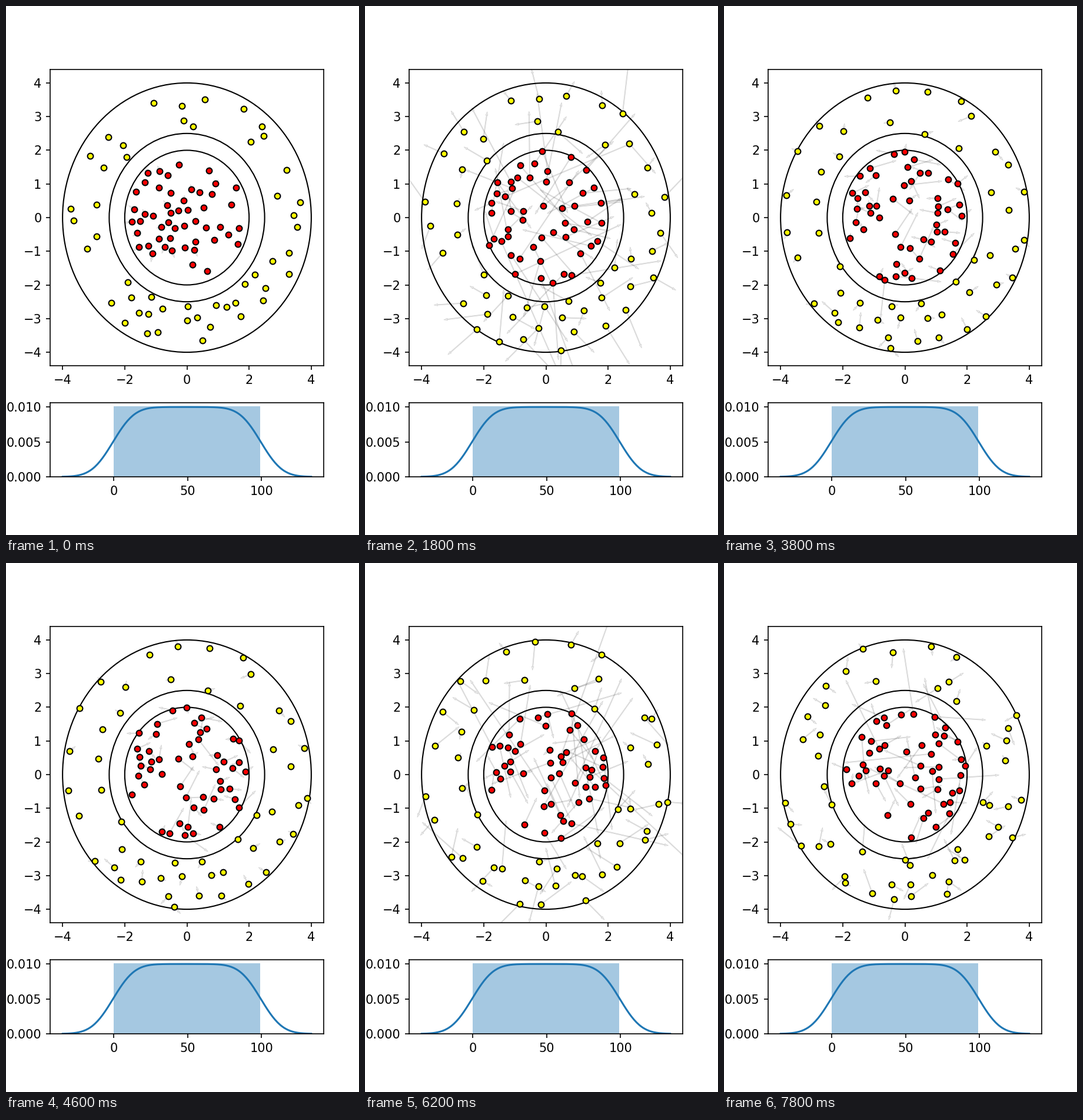
A matplotlib script for the animation above (8000 ms loop, 600 by 900 pixels).

```python
import numpy as np
import matplotlib.pyplot as plt
from matplotlib.animation import FuncAnimation

FRAMES, INTERVAL = 40, 200
SUBSTEPS = 12
COUNT = 50             # balls per chamber
CONTACT = 0.2          # centre distance at which two balls collide
REPULSION = 0.027      # strength of the push that starts the motion
ADVANCE = 0.0522       # share of a drift vector covered per frame at pace 1


def pace(frame):
    """Shared speed of all balls: two surges with a lull between."""
    return np.interp(frame, [0, 4, 9, 15, 23, 31, 35, 39],
                     [.26, 1.75, 4, 1.4, .9, 3.7, 3.5, 2.1])


def scatter(rng, inner, outer, power, gap):
    """Random points in a ring, none closer together than gap."""
    points = []
    while len(points) < COUNT:
        r = inner + (outer - inner) * rng.random() ** power
        angle = rng.uniform(0, 2 * np.pi)
        p = r * np.array([np.cos(angle), np.sin(angle)])
        if all(np.hypot(*(p - q)) > gap for q in points):
            points.append(p)
    return np.array(points)


def repel(pos):
    """Inverse-square push on each ball from all the others."""
    diff = pos[:, None] - pos[None]
    dist = np.linalg.norm(diff, axis=2)
    np.fill_diagonal(dist, np.inf)
    return REPULSION * (diff / dist[..., None] ** 3).sum(axis=1)


def bounce_walls(pos, vel, inner, outer):
    r = np.hypot(*pos.T)
    normal = pos / r[:, None]
    out = (vel * normal).sum(axis=1)
    hit = ((r > outer) & (out > 0)) | ((r < inner) & (out < 0))
    vel[hit] -= 2 * out[hit, None] * normal[hit]


def bounce_pairs(pos, vel):
    gap = np.linalg.norm(pos[:, None] - pos[None], axis=2)
    for i, j in np.argwhere(np.triu(gap < CONTACT, 1)):
        normal = (pos[i] - pos[j]) / gap[i, j]
        closing = (vel[i] - vel[j]) @ normal
        if closing < 0:
            vel[i] -= closing * normal
            vel[j] += closing * normal


def simulate(pos, inner, outer):
    """Positions and velocities for every frame of the loop."""
    vel = repel(pos)
    track = []
    for frame in range(FRAMES):
        track.append((pos.copy(), vel * pace(frame)))
        for sub in range(SUBSTEPS):
            t = frame + (sub + 0.5) / SUBSTEPS
            pos += vel * pace(t) * ADVANCE / SUBSTEPS
            bounce_walls(pos, vel, inner, outer)
            bounce_pairs(pos, vel)
    return track


def draw_density(ax):
    """One histogram bar over 0..99 and its kernel density curve."""
    data = np.arange(100)
    width = data.std(ddof=1) * len(data) ** -0.2
    x = np.linspace(-3 * width, 99 + 3 * width, 200)
    z = (x[:, None] - data) / width
    y = np.exp(-z ** 2 / 2).mean(axis=1) / (width * np.sqrt(2 * np.pi))
    ax.bar(0, 1 / 99, width=99, align="edge", color="C0", alpha=0.4)
    ax.plot(x, y, color="C0", lw=1.5)
    pad = 0.05 * (x[-1] - x[0])
    ax.set_xlim(x[0] - pad, x[-1] + pad)
    ax.set_ylim(0, 1.05 / 99)


fig = plt.figure(figsize=(4, 6), dpi=150, facecolor="white")
ax = fig.add_axes([0.125, 0.32, 0.775, 0.56])
ax.set_xlim(-4.4, 4.4)
ax.set_ylim(-4.4, 4.4)
for radius in (2, 2.5, 4):
    ax.add_patch(plt.Circle((0, 0), radius, fill=False, lw=1, zorder=2))
draw_density(fig.add_axes([0.125, 0.11, 0.775, 0.14]))

rng = np.random.default_rng(4)
tracks = [simulate(scatter(rng, 0, 1.85, 0.75, 0.23), 0, 2),
          simulate(scatter(rng, 2.6, 3.75, 1, 0.25), 2.5, 4)]
balls = [ax.plot([], [], "o", color=color, ms=4.7, mec="black", mew=1,
                 zorder=3)[0] for color in ("red", "yellow")]
start = np.vstack([track[0][0] for track in tracks])
arrows = ax.quiver(*start.T, *start.T, angles="xy", scale_units="xy", scale=1,
                   width=0.0027, fc=(0, 0, 0, 0.05), ec=(0, 0, 0, 0.15),
                   linewidth=0.4, zorder=1)


def update(frame):
    for ball, track in zip(balls, tracks):
        ball.set_data(*track[frame][0].T)
    pos = np.vstack([track[frame][0] for track in tracks])
    vel = np.vstack([track[frame][1] for track in tracks])
    arrows.set_offsets(pos)
    # Quiver measures its angles from XY, so keep it in step.
    arrows.XY = pos
    arrows.set_UVC(*vel.T)
    return [arrows, *balls]


anim = FuncAnimation(fig, update, frames=FRAMES, interval=INTERVAL,
                     repeat=True, repeat_delay=0, blit=False)
plt.show()
```
